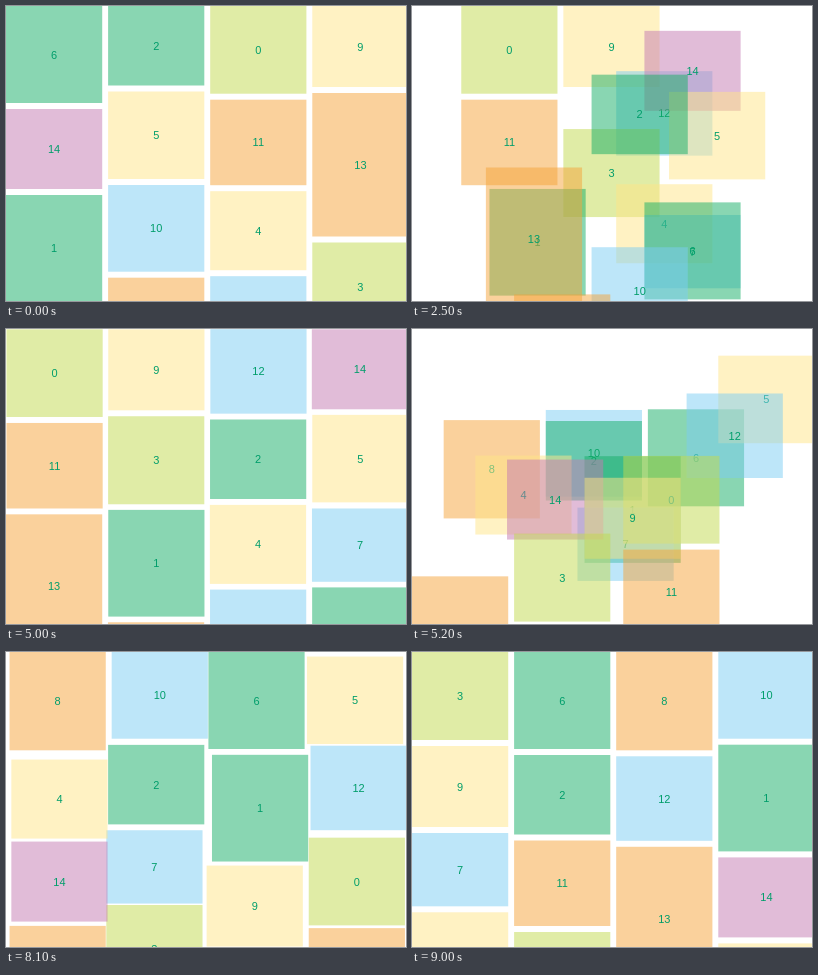
These frames come from a looping animation (400 px wide and 295 px high, 10000 ms). An HTML page with a canvas:

```html
<!DOCTYPE html>
<html lang="en">
<head>
<meta charset="utf-8">
<title>Waterfall shuffle</title>
<style>
  html, body { margin: 0; overflow: hidden; background: #fff; }
  canvas { display: block; }
</style>
</head>
<body>
<canvas width="400" height="295"></canvas>
<script>
const ctx = document.querySelector('canvas').getContext('2d');

const LOOP = 10000, MOVE = 500;
const COLUMNS = 4, PITCH = 102.1, WIDTH = 96.2, GAP = 6;

const green = 'rgba(21,174,103,.5)', orange = 'rgba(245,163,59,.5)',
      yellow = 'rgba(255,230,135,.5)', lime = 'rgba(194,217,78,.5)',
      purple = 'rgba(195,123,177,.5)', blue = 'rgba(125,205,244,.5)';

// Indexed by the number shown on the tile
const tiles = [
  [87.7, lime], [106.7, green], [79.5, green], [88, lime], [79, yellow],
  [87.5, yellow], [97, green], [73.3, blue], [98.3, orange], [81, yellow],
  [86.7, blue], [85.5, orange], [84.5, blue], [143.5, orange], [80, purple]
].map(([height, color]) => ({ height, color }));

// Each order takes effect at its start time
const stages = [
  { start: -MOVE, order: [6, 2, 0, 9, 5, 13, 11, 14, 10, 4, 1, 3, 12, 8, 7] },
  { start: 2264, order: [0, 9, 12, 14, 5, 3, 2, 11, 4, 7, 1, 13, 6, 10, 8] },
  { start: 4983, order: [8, 10, 6, 5, 2, 12, 1, 4, 7, 0, 14, 9, 3, 13, 11] },
  { start: 8045, order: [3, 6, 8, 10, 1, 9, 2, 12, 7, 11, 13, 14, 5, 0, 4] }
];
for (const stage of stages) stage.places = layout(stage.order);

// Put every tile in the column that is shortest so far
function layout(order) {
  const bottoms = Array(COLUMNS).fill(0);
  const places = [];
  for (const id of order) {
    const column = bottoms.indexOf(Math.min(...bottoms));
    places[id] = { x: column * PITCH, y: bottoms[column] };
    bottoms[column] += tiles[id].height + GAP;
  }
  return places;
}

// cubic-bezier(.55, 0, .1, 1)
function ease(x) {
  if (x >= 1) return 1;
  let low = 0, high = 1;
  for (let i = 0; i < 30; i++) {
    const s = (low + high) / 2, r = 1 - s;
    if (1.65 * r * r * s + 0.3 * r * s * s + s ** 3 < x) low = s;
    else high = s;
  }
  return low * low * (3 - 2 * low);
}

function draw(time) {
  const current = stages.findLastIndex(stage => stage.start <= time);
  const { start, order, places } = stages[current];
  const before = stages[Math.max(current - 1, 0)].places;
  const progress = ease((time - start) / MOVE);
  const mix = (a, b) => a + (b - a) * progress;

  ctx.clearRect(0, 0, 400, 295);
  ctx.font = '11px Arial, "Liberation Sans", sans-serif';
  ctx.textAlign = 'center';
  for (const id of order) {
    const { height, color } = tiles[id];
    const x = mix(before[id].x, places[id].x);
    const y = mix(before[id].y, places[id].y);
    ctx.fillStyle = color;
    ctx.fillRect(x, y, WIDTH, height);
    ctx.fillStyle = 'rgb(0,158,107)';
    ctx.fillText(id, x + WIDTH / 2, y + height / 2 + 4);
  }
}

function frame() {
  draw(performance.now() % LOOP);
  requestAnimationFrame(frame);
}
frame();
</script>
</body>
</html>
```
